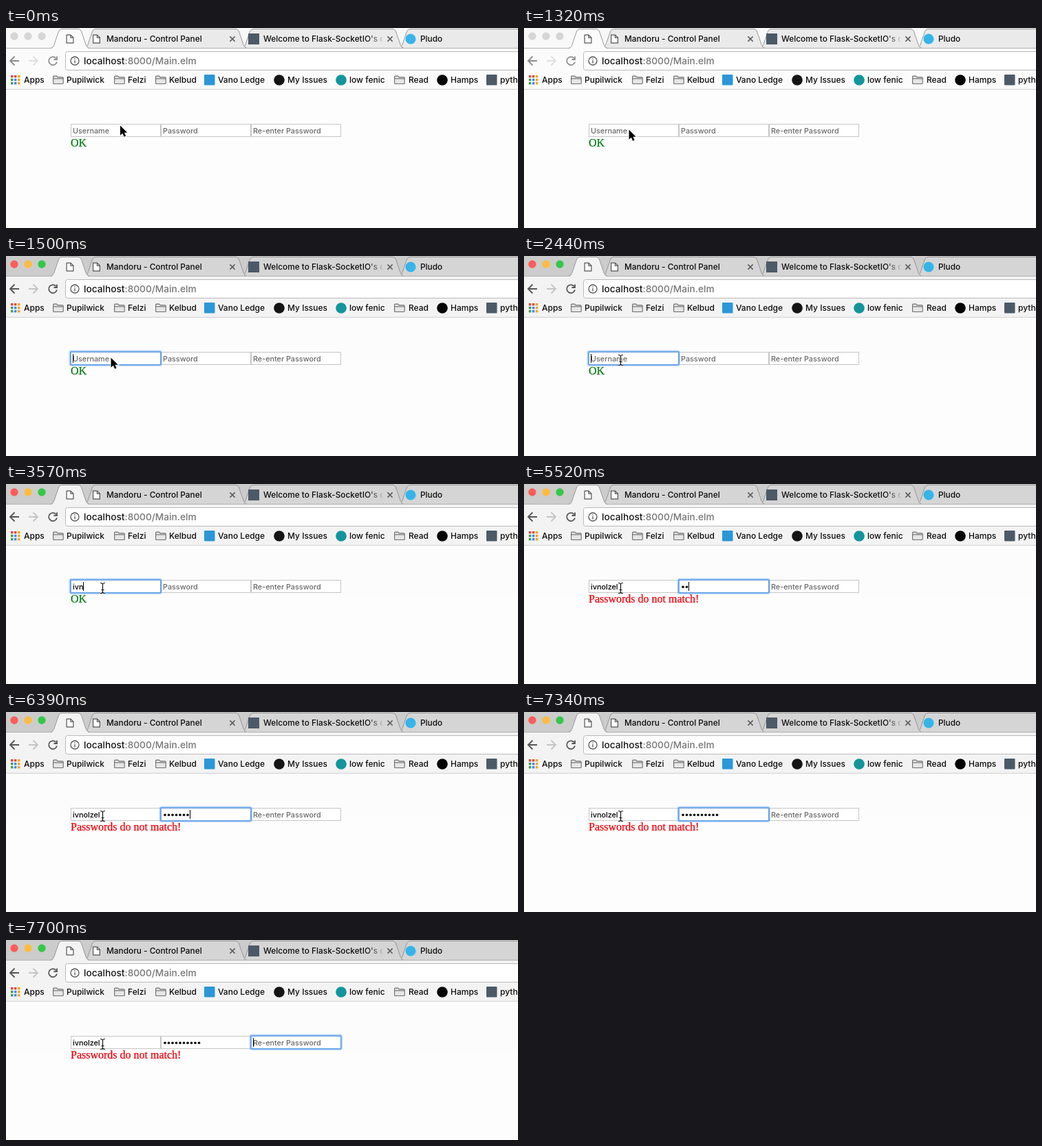
Animation of 744 by 292 pixels, one loop 8000 ms. Source, as an HTML page:

```html
<!DOCTYPE html>
<html lang="en">
<head>
<meta charset="utf-8">
<title>Sign-up form</title>
<style>
html, body { margin: 0; width: 100%; height: 100%; overflow: hidden; background: #fdfdfd; }
svg { display: block; width: 744px; height: 292px; font-family: Inter, Roboto, sans-serif; }
text { white-space: pre; font-weight: 450; }
.tab { font-size: 11.85px; fill: #0c0c0c; }
.mark { font-size: 12px; fill: #0c0c0c; }
.url { font-size: 13.7px; fill: #767676; }
.field { font-size: 10.8px; fill: #000; }
.hint { fill: #696969; }
.msg { font: 16px "Liberation Serif", serif; stroke-width: .25px; }
</style>
</head>
<body>
<svg id="stage" viewBox="0 0 744 292">
  <defs>
    <linearGradient id="fade" gradientUnits="userSpaceOnUse" x1="526" x2="550" y1="0" y2="0">
      <stop stop-color="#0c0c0c"/>
      <stop offset="1" stop-color="#0c0c0c" stop-opacity="0"/>
    </linearGradient>
    <clipPath id="titleClip"><path d="M370 4h177v24H370z"/></clipPath>
    <g id="page" fill="#fff" stroke="#555" stroke-width="1.2">
      <path d="M.6 .6H6.4L10.4 4.6V12.4H.6Z"/>
      <path d="M6.4 .6V4.6H10.4" fill="none"/>
    </g>
    <g id="folder" fill="#e6e6e6" stroke="#6d6d6d" stroke-width="1.1" stroke-linejoin="round">
      <path d="M.6 11V1.8Q.6 .6 1.8 .6H5.6L7.2 2.4H14Q15.2 2.4 15.2 3.6V11Q15.2 12 14 12H1.8Q.6 12 .6 11Z"/>
      <path d="M.6 4.4H15.2" fill="none"/>
    </g>
    <path id="close" d="M-3.6 -3.6L3.6 3.6M3.6 -3.6L-3.6 3.6" stroke="#5c5c5c" stroke-width="1.5"/>
    <path id="beamShape" d="M-3.5 -7.5Q0 -7.5 0 -5.5Q0 -7.5 3.5 -7.5M0 -5.5V5.5M-3.5 7.5Q0 7.5 0 5.5Q0 7.5 3.5 7.5M-2 2.5H2"/>
  </defs>

  <rect width="744" height="292" fill="#fdfdfd"/>
  <rect id="pageTop" y="90" width="744" height="72" fill="#fcfcfc"/>

  <!-- window frame and tabs -->
  <rect id="strip" width="744" height="30"/>
  <g id="lights"></g>
  <g id="backTabs" stroke="#979797"></g>
  <path d="M0 29.5H744" stroke="#b2b2b2"/>
  <g id="toolbar">
    <rect y="30" width="744" height="60"/>
    <path id="frontTab" stroke="#979797"/>
    <rect x="67" y="29" width="52" height="2"/>
  </g>
  <use href="#page" x="87.5" y="9.5"/>
  <use href="#page" x="126" y="9.5"/>
  <text class="tab" x="146" y="20">Mandoru - Control Panel</text>
  <use href="#close" x="329" y="16"/>
  <rect x="352" y="8" width="16" height="16" fill="#4c5a67"/>
  <text class="tab" x="374" y="20" clip-path="url(#titleClip)" style="fill:url(#fade)">Welcome to Flask-SocketIO's documentation</text>
  <use href="#close" x="558" y="16"/>
  <circle cx="588" cy="16" r="7.5" fill="#35b4ea"/>
  <text class="tab" x="602" y="20">Pludo</text>

  <!-- toolbar -->
  <g fill="none" stroke-width="1.8">
    <g id="nav">
      <path d="M19 48H6M12.5 41.5L6 48L12.5 54.5"/>
      <path d="M72.8 44.2A6 6 0 1 0 74 49.5M74 41.5V46H69.5"/>
    </g>
    <path id="forward" d="M33 48H46M39.5 41.5L46 48L39.5 54.5"/>
  </g>
  <rect x="86.5" y="34.5" width="670" height="27" rx="3" fill="#fff" stroke="#b9b9b9"/>
  <g fill="none" stroke="#555" stroke-width="1.3">
    <circle cx="100" cy="48" r="6"/>
    <path d="M100 47V51.5M100 44.3V45.8"/>
  </g>
  <text class="url" x="113" y="53"><tspan fill="#151515">localhost</tspan>:8000/Main.elm</text>

  <g id="bookmarks"></g>
  <path d="M0 89.5H744" stroke="#d0d0d0"/>

  <!-- form -->
  <g id="fields"></g>
  <g id="focus" fill="none" stroke="#5a9fec">
    <rect x="-1" y="-1" width="132.5" height="20.5" rx="2.5" stroke-width="3" opacity=".4"/>
    <rect x="-.2" y="-.2" width="131" height="19" rx="1" stroke-width="1.8" opacity=".85"/>
  </g>
  <text class="field" id="name" x="97" y="154"></text>
  <g id="dots"></g>
  <rect id="caret" y="143" width="1" height="13" fill="#000"/>
  <text class="msg" id="msg" x="94" y="173"></text>

  <!-- pointers -->
  <path id="arrow" d="M0 0V14.2L3.3 11.2L5.6 16.3L8.1 15.2L5.9 10.2H10.2Z" fill="#000" stroke="#fff" stroke-width="2" paint-order="stroke"/>
  <g id="beam" fill="none">
    <use href="#beamShape" stroke="#fff" stroke-width="2.6"/>
    <use href="#beamShape" stroke="#111" stroke-width="1.2"/>
  </g>
</svg>
<script>
const LOOP = 8000;
const USER = "ivnolzel";
const FIELD_X = [94, 225, 356];
const HINTS = ["Username", "Password", "Re-enter Password"];
const ACTIVATE = 1500;
const FOCUS_TIMES = [ACTIVATE, 4630, 7700];
const NAME_KEYS = [3210, 3330, 3570, 3810, 3920, 4100, 4150, 4330];
const PASS_KEYS = [5340, 5520, 5750, 5930, 6040, 6160, 6390, 6510, 6690, 6860];
const CARET_OFF = [[1960, 2440], [2970, 3210], [5100, 5340], [7340, 7700]];
const POINTER = [
  [0, 166, 142.5], [1080, 164, 144], [1160, 158, 146], [1240, 154, 147],
  [1320, 152.5, 148.5], [1740, 148, 149], [1810, 143, 151], [1880, 140.5, 152]
];
const BEAM_FROM = 1740;
const INACTIVE = {
  strip: "#f8f8f8", backTabs: "#eaeaea", toolbar: "#fbfbfb",
  nav: "#8e8e8e", forward: "#dedede", lights: Array(3).fill("#d6d6d6")
};
const ACTIVE = {
  strip: "#cccccc", backTabs: "#d5d5d5", toolbar: "#f3f3f3",
  nav: "#555", forward: "#c4c4c4", lights: ["#fc5d58", "#fdbc40", "#34c749"]
};

const $ = id => document.getElementById(id);

function add(parent, tag, attrs, text = "") {
  const node = document.createElementNS("http://www.w3.org/2000/svg", tag);
  for (const key in attrs) node.setAttribute(key, attrs[key]);
  node.textContent = text;
  return parent.appendChild(node);
}

const tabPath = (left, right) =>
  `M${left} 29.5Q${left + 3} 29 ${left + 4.5} 25.5L${left + 11.5} 5Q${left + 13} 1.5 ${left + 16} 1.5` +
  `H${right - 16}Q${right - 13} 1.5 ${right - 11.5} 5L${right - 4.5} 25.5Q${right - 3} 29 ${right} 29.5`;

const lights = [12, 32, 52].map(cx => add($("lights"), "circle", { cx, cy: 12, r: 5.7 }));

// Right-hand tabs sit under their left neighbours.
for (const [left, right] of [[571, 806], [343, 578], [114, 350]])
  add($("backTabs"), "path", { d: tabPath(left, right) });
$("frontTab").setAttribute("d", tabPath(65, 121));

const bar = $("bookmarks");
const appColors = ["#e8453c", "#e8453c", "#f2a60d", "#3b9c4f", "#4285f4", "#f2a60d", "#3b9c4f", "#4285f4", "#f2a60d"];
appColors.forEach((fill, i) =>
  add(bar, "rect", { x: 7 + i % 3 * 5, y: 69 + Math.floor(i / 3) * 5, width: 3.4, height: 3.4, fill }));
for (const x of [68, 157, 217, 564]) add(bar, "use", { href: "#folder", x, y: 69.5 });
for (const [x, fill] of [[288, "#2b97d8"], [698, "#4c5a67"]])
  add(bar, "rect", { x, y: 68, width: 15.5, height: 15.5, rx: 1, fill });
for (const [cx, fill] of [[397, "#151515"], [487, "#12959c"], [634, "#050505"]])
  add(bar, "circle", { cx, cy: 76, r: 7.8, fill });
const labels = [
  [26, "Apps"], [88, "Pupilwick"], [177, "Felzi"], [237, "Kelbud"], [308, "Vano Ledge"],
  [409, "My Issues"], [499, "low fenic"], [585, "Read"], [646, "Hamps"], [718, "python"]
];
for (const [x, label] of labels) add(bar, "text", { class: "mark", x, y: 80 }, label);

const hints = FIELD_X.map((x, i) => {
  add($("fields"), "rect", { x: x + 0.5, y: 140.5, width: 130, height: 18, fill: "#fff", stroke: "#c6c6c6" });
  return add($("fields"), "text", { class: "field hint", x: x + 3, y: 154 }, HINTS[i]);
});

const dots = PASS_KEYS.map((_, i) =>
  add($("dots"), "circle", { cx: 231 + i * 5.5, cy: 150.3, r: 1.8 }));

const countUntil = (times, t) => times.filter(start => start <= t).length;
const show = (node, visible) => node.setAttribute("visibility", visible ? "visible" : "hidden");
const move = (node, x, y) => node.setAttribute("transform", `translate(${x} ${y})`);

function paintWindow(theme) {
  for (const id of ["strip", "backTabs", "toolbar"]) $(id).setAttribute("fill", theme[id]);
  for (const id of ["nav", "forward"]) $(id).setAttribute("stroke", theme[id]);
  lights.forEach((light, i) => light.setAttribute("fill", theme.lights[i]));
}

function render(t) {
  const active = t >= ACTIVATE;
  paintWindow(active ? ACTIVE : INACTIVE);
  show($("pageTop"), active);

  const typed = countUntil(NAME_KEYS, t);
  const hidden = countUntil(PASS_KEYS, t);
  $("name").textContent = USER.slice(0, typed);
  dots.forEach((dot, i) => show(dot, i < hidden));
  show(hints[0], !typed);
  show(hints[1], !hidden);

  const field = countUntil(FOCUS_TIMES, t) - 1;
  show($("focus"), active);
  if (active) {
    move($("focus"), FIELD_X[field], 140);
    const nameWidth = typed ? $("name").getComputedTextLength() : 0;
    const offset = [nameWidth, hidden * 5.5, 0][field];
    $("caret").setAttribute("x", Math.round(FIELD_X[field] + 3 + offset));
  }
  show($("caret"), active && !CARET_OFF.some(([from, to]) => t >= from && t < to));

  const color = hidden ? "#f0000c" : "#007a10";
  $("msg").textContent = hidden ? "Passwords do not match!" : "OK";
  $("msg").setAttribute("fill", color);
  $("msg").setAttribute("stroke", color);

  const [, x, y] = POINTER[countUntil(POINTER.map(step => step[0]), t) - 1];
  const beam = t >= BEAM_FROM;
  show($("arrow"), !beam);
  show($("beam"), beam);
  move(beam ? $("beam") : $("arrow"), x, y);
}

const start = performance.now();
function tick() {
  render((performance.now() - start) % LOOP);
  requestAnimationFrame(tick);
}
tick();
</script>
</body>
</html>
```
